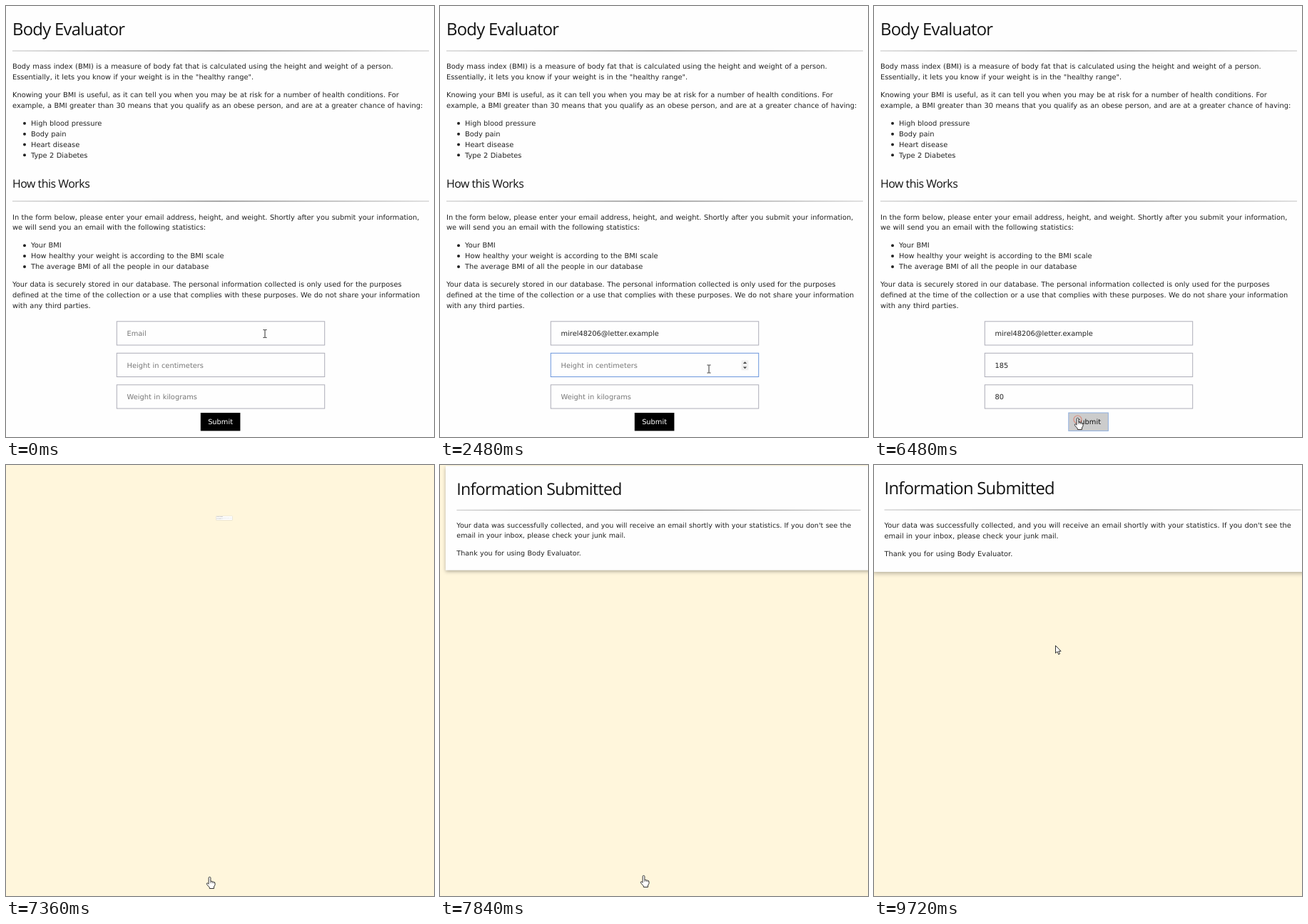
Write an HTML page that moves like this. It is 600 px wide and 605 px high and loops after 9760 ms.

```html
<!DOCTYPE html>
<html lang="en">
<head>
<meta charset="utf-8">
<title>Body Evaluator</title>
<style>
  html, body { margin: 0; width: 100%; height: 100%; overflow: hidden; background: #fefefe; }
  svg { display: block; width: 600px; height: 605px; }
  text { font: 9.85px "DejaVu Sans", sans-serif; word-spacing: .33px; fill: #222; white-space: pre; text-rendering: geometricPrecision; }
  .h1, .h2 { font-family: "Open Sans", sans-serif; letter-spacing: -.03em; word-spacing: 0; fill: #111; }
  .h1 { font-size: 23.8px; }
  .h2 { font-size: 15.9px; }
  .field { fill: #fefefe; stroke: #adadb8; }
  .card { fill: #fefefe; filter: drop-shadow(0 2px 3px rgba(0, 0, 0, .3)); }
  .cursor { fill: #fff; stroke: #333; stroke-width: 1; stroke-linejoin: round; }
</style>
</head>
<body>
<svg viewBox="0 0 600 605">
  <defs>
    <linearGradient id="rule">
      <stop stop-color="#ccc"/><stop offset=".5" stop-color="#707070"/><stop offset="1" stop-color="#ccc"/>
    </linearGradient>
  </defs>
  <g id="formPage">
    <rect width="600" height="605" fill="#fefefe"/>
    <g id="copy"></g>
    <g id="fields"></g>
    <rect id="button" x="272.8" y="571" width="55.6" height="25.4"/>
    <text id="label" x="300.6" y="587.3" text-anchor="middle">Submit</text>
  </g>
  <g id="donePage">
    <rect width="600" height="605" fill="#fff6dc"/>
    <g id="card"><rect class="card" x="-1.5" y="-1" width="615.5" height="151"/></g>
  </g>
  <circle id="ring" r="5.5" cx="285.5" cy="580.5" fill="none" stroke="#e0553c" stroke-width="1.2"/>
  <g id="cursor" class="cursor">
    <path id="beam" fill="none" d="M-2.5-5.5H-.7L0-5 .7-5.5H2.5M0-5V5M-2.5 5.5H-.7L0 5 .7 5.5H2.5"/>
    <g id="hand">
      <path d="M-1.4 9V1.2a1.4 1.4 0 0 1 2.8 0V6q1.3-.8 2.3.4 1.2-.5 2 .6 1.8-.3 1.8 1.6V11L6 13.5V16H-.2V14.5L-4 10.2q-.8-1.6.6-1.9 1 0 2 1.5Z"/>
      <path fill="none" stroke-width=".7" d="M1.4 6v2.5M3.7 6.6v2M5.7 7.2v1.6"/>
    </g>
    <path id="arrow" d="M0 0V10.6L2.5 8.4 4.2 12.4 6 11.6 4.3 7.8H7.6Z"/>
  </g>
</svg>
<script>
const LOOP = 9760;
const $ = id => document.getElementById(id);
const show = (el, on) => { el.style.display = on ? '' : 'none'; };
const within = (t, from, to) => t >= from && t < to;

const text = (x, y, str, cls = '') => `<text class="${cls}" x="${x}" y="${y}">${str}</text>`;
const rule = (x, y) => `<rect x="${x}" y="${y}" width="584" height="1.2" fill="url(#rule)"/>`;
const lines = (x, y, rows) => rows.map((row, i) => text(x, y + i * 14.85, row)).join('');
const list = (y, rows) => lines(35, y, rows) +
  rows.map((_, i) => `<circle cx="26" cy="${y - 3.2 + i * 14.85}" r="2" fill="#222"/>`).join('');

$('copy').innerHTML =
  text(9, 41, 'Body Evaluator', 'h1') + rule(9, 62.4) +
  lines(9, 88.4, [
    'Body mass index (BMI) is a measure of body fat that is calculated using the height and weight of a person.',
    'Essentially, it lets you know if your weight is in the "healthy range".']) +
  lines(9, 128.3, [
    'Knowing your BMI is useful, as it can tell you when you may be at risk for a number of health conditions. For',
    'example, a BMI greater than 30 means that you qualify as an obese person, and are at a greater chance of having:']) +
  list(168, ['High blood pressure', 'Body pain', 'Heart disease', 'Type 2 Diabetes']) +
  text(9, 255, 'How this Works', 'h2') + rule(9, 273.4) +
  lines(9, 299.6, [
    'In the form below, please enter your email address, height, and weight. Shortly after you submit your information,',
    'we will send you an email with the following statistics:']) +
  list(339.4, ['Your BMI', 'How healthy your weight is according to the BMI scale',
    'The average BMI of all the people in our database']) +
  lines(9, 394.2, [
    'Your data is securely stored in our database. The personal information collected is only used for the purposes',
    'defined at the time of the collection or a use that complies with these purposes. We do not share your information',
    'with any third parties.']);

$('card').innerHTML +=
  text(14.5, 41, 'Information Submitted', 'h1') + rule(14.5, 62.4) +
  lines(14.5, 88.4, [
    "Your data was successfully collected, and you will receive an email shortly with your statistics. If you don't see the",
    'email in your inbox, please check your junk mail.']) +
  text(14.5, 128.3, 'Thank you for using Body Evaluator.');

// typed: [time, value]; focus, spin and caret: [from, to] spans
const fields = [
  { hint: 'Email', typed: [[520, 'mirel48206@letter.example']],
    focus: [40, 1320], spin: [0, 0], caret: [[40, 1040]] },
  { hint: 'Height in centimeters', typed: [[2560, '1'], [2700, '18'], [2840, '185']],
    focus: [1320, 3080], spin: [1120, 4720], caret: [[1320, 1820], [2560, 3080]] },
  { hint: 'Weight in kilograms', typed: [[3880, '8'], [3920, '80']],
    focus: [3080, 6040], spin: [3080, 6040], caret: [[3160, 3720], [3880, 4520], [4920, 6040]] }
];

fields.forEach((field, i) => {
  const y = 442.8 + i * 44.5;
  const g = document.createElementNS('http://www.w3.org/2000/svg', 'g');
  g.innerHTML = `<rect class="field" x="155.3" y="${y}" width="291.4" height="33.2"/>` +
    text(169.5, y + 20.6, '') +
    `<rect y="${y + 11}" width="1" height="12" fill="#111"/>
     <g transform="translate(427.5 ${y + 17})"><rect x="-5" y="-7" width="10" height="14" fill="#efefef"/>
     <path fill="#444" d="M-2.6-2.2H2.6L0-5ZM-2.6 2.2H2.6L0 5Z"/></g>`;
  $('fields').append(g);
  [field.box, field.label, field.bar, field.spinner] = g.children;
});

function drawField(f, t) {
  const entry = f.typed.filter(([at]) => t >= at).pop();
  const value = entry ? entry[1] : '';
  const content = value || f.hint;
  if (f.label.textContent !== content) f.label.textContent = content;
  f.label.style.fill = value ? '#222' : '#777';
  f.box.style.stroke = within(t, ...f.focus) ? '#6c96dc' : '';
  show(f.spinner, within(t, ...f.spin));
  const caretOn = f.caret.some(span => within(t, ...span));
  show(f.bar, caretOn);
  if (caretOn) f.bar.setAttribute('x', 169.5 + (value ? f.label.getComputedTextLength() + .5 : 0));
}

// CSS "ease" curve, solved by bisection
function ease(x) {
  if (x <= 0) return 0;
  if (x >= 1) return 1;
  let lo = 0, hi = 1, u;
  for (let i = 0; i < 20; i++) {
    u = (lo + hi) / 2;
    const bx = .75 * u * (1 - u) + u ** 3;
    if (bx < x) lo = u; else hi = u;
  }
  return .3 * u * (1 - u) ** 2 + 3 * u * u * (1 - u) + u ** 3;
}

// time, x, y of the pointer's hot spot
const path = [
  [0, 363, 460], [1040, 363, 460], [1160, 377, 509.5], [4640, 377, 509.5], [4920, 285.5, 578.5],
  [7400, 285.5, 578.5], [7480, 285.5, 576.5], [8400, 285.5, 576.5], [8840, 268, 340],
  [9320, 249, 186], [9560, 254.5, 253.5], [LOOP, 254.5, 253.5]
];
function pointerAt(t) {
  const i = path.findIndex(p => p[0] > t);
  const [t0, x0, y0] = path[i - 1], [t1, x1, y1] = path[i];
  const k = (t - t0) / (t1 - t0), s = k * k * (3 - 2 * k);
  return [x0 + (x1 - x0) * s, y0 + (y1 - y0) * s];
}

function draw(t) {
  const done = t >= 7350;
  show($('formPage'), !done);
  show($('donePage'), done);
  if (done) {
    const scale = ease((t - 7325) / 663);
    $('card').setAttribute('transform', `translate(306 74.5) scale(${scale}) translate(-306 -74.5)`);
  } else {
    fields.forEach(f => drawField(f, t));
    const hover = t >= 4880;
    $('button').style.fill = hover ? '#ccc' : '#000';
    $('button').style.stroke = t >= 6040 ? '#8fb0e0' : 'none';
    $('label').style.fill = hover ? '#111' : '#fff';
  }
  show($('ring'), within(t, 6040, 7040));
  $('ring').style.opacity = 1 - (t - 6040) / 1000;

  $('cursor').setAttribute('transform', `translate(${pointerAt(t)})`);
  show($('beam'), t < 4840);
  show($('hand'), within(t, 4840, 8400));
  show($('arrow'), t >= 8400);
}

const start = performance.now();
function tick() {
  draw((performance.now() - start) % LOOP);
  requestAnimationFrame(tick);
}
tick();
</script>
</body>
</html>
```
